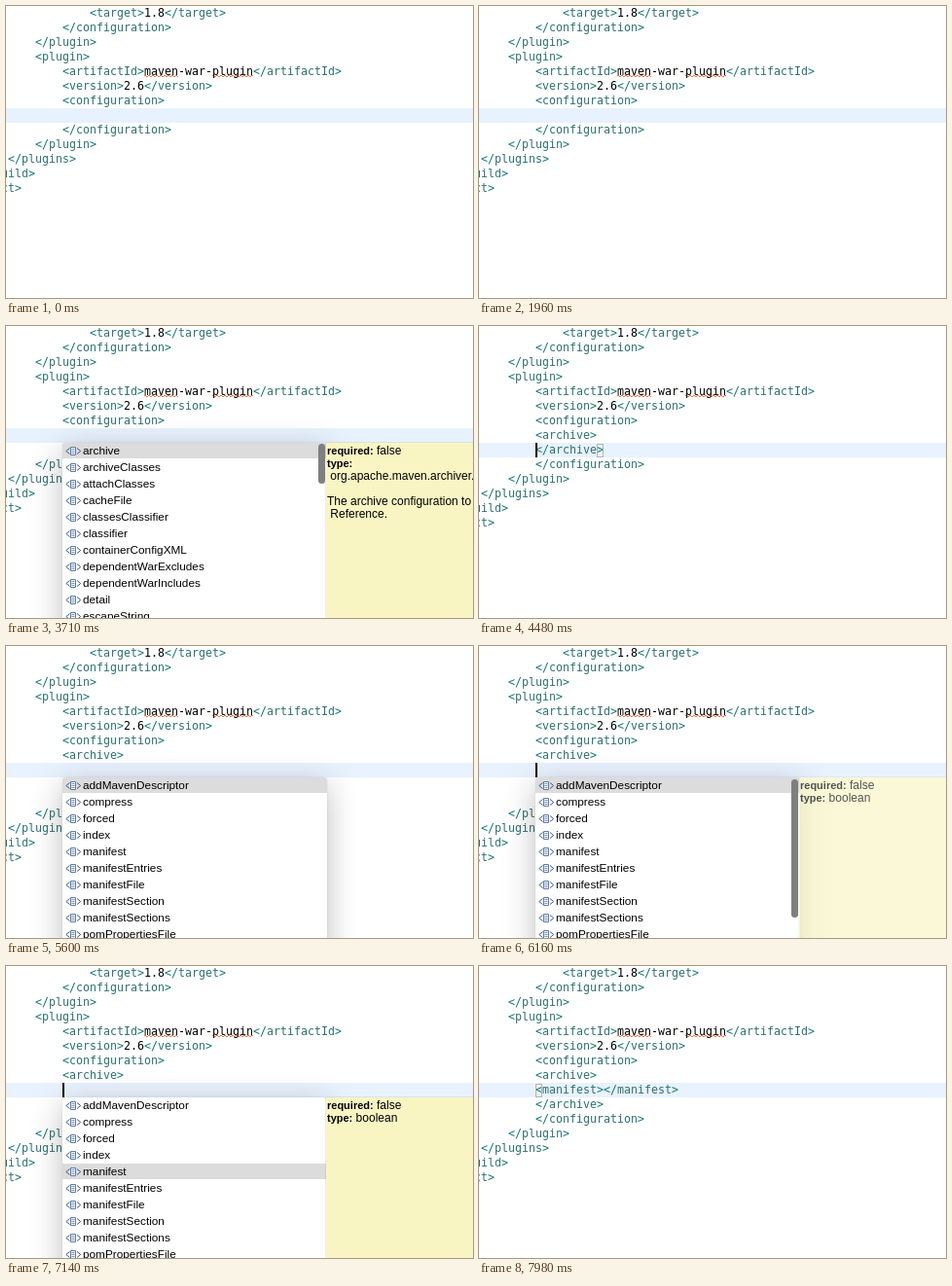
These frames come from a looping animation (480x300 px, 8000 ms). An HTML page:

```html
<!DOCTYPE html>
<html lang="en">
<head>
<meta charset="utf-8">
<title>Editor completion</title>
<style>
html, body { margin: 0; width: 100%; height: 100%; overflow: hidden; background: #fff; }
#stage { position: relative; width: 480px; height: 300px; overflow: hidden; background: #fff; }
#stage div { position: absolute; box-sizing: border-box; }

#code { inset: 0; font: 11.63px/15px "DejaVu Sans Mono", monospace; color: #000; white-space: pre; }
#code .tag { color: #2f7070; }
#code .tag i { color: #147474; font-style: normal; }
.typo {
  display: inline-block; height: 15px; vertical-align: top;
  background:
    repeating-linear-gradient(90deg, #ec7a48 0 2px, transparent 2px 4px) 0 11px / 100% 1px no-repeat,
    repeating-linear-gradient(90deg, transparent 0 2px, #ec7a48 2px 4px) 0 12px / 100% 1px no-repeat;
}
#current { left: 0; width: 480px; height: 15px; background: #e8f2fe; }
#caret { width: 2px; height: 15px; background: #000; }
#match { width: 7px; height: 14px; border: 1px solid #b4b4b4; }

.popup, .doc { color: #000; white-space: pre; }
.popup { left: 58px; width: 272px; height: 240px; background: #fff; border-radius: 4px;
  font: 11.8px/17px "Liberation Sans", Arial, sans-serif;
  box-shadow: 0 8px 32px rgba(0, 0, 0, .26), 0 0 1px rgba(0, 0, 0, .3); }
.popup .rows { inset: 0; overflow: hidden; border-radius: 4px; }
.popup .row { left: 0; width: 272px; height: 16px; padding-left: 21px; }
.popup .row.on { background: #dcdcdc; }
.popup svg { position: absolute; left: 3px; top: 3px; }
.thumb { left: 263px; width: 7px; border-radius: 4px; background: #7f7f7f; }
.doc { left: 329px; width: 200px; height: 240px; padding: 2px 0 0 1px;
  font: 12px/13px "Liberation Sans", Arial, sans-serif;
  background: #f9f5c3; box-shadow: 0 0 1px rgba(0, 0, 0, .4); }
.doc b { font-size: 11px; }
</style>
</head>
<body>
<div id="stage">
  <div id="current"></div>
  <div id="code"></div>
  <div id="match"></div>
  <div id="caret"></div>
</div>
<script>
const LOOP = 8000, TICK = 70, LINE = 15, ROW = 17;
const stage = document.getElementById('stage');
const [current, code, match, caret] =
  ['current', 'code', 'match', 'caret'].map(id => document.getElementById(id));

// Lines are [indent level, text]; one level is four characters.
const head = [
  [3, '<target>1.8</target>'],
  [2, '</configuration>'],
  [1, '</plugin>'],
  [1, '<plugin>'],
  [2, '<artifactId>~maven~-war-~plugin~</artifactId>'],
  [2, '<version>2.6</version>'],
  [2, '<configuration>']
];
const tail = [
  [2, '</configuration>'],
  [1, '</plugin>'],
  [0, '</plugins>'],
  [-1, '</build>'],
  [-2, '</project>']
];

const edits = [
  { at: 0, row: 7, lines: [''] },
  { at: 3780, row: 7, lines: ['<archive></archive>'] },
  { at: 4480, row: 8, lines: ['<archive>', '</archive>'] },
  { at: 4620, row: 9, lines: ['<archive>', '', '</archive>'] },
  { at: 5040, row: 8, lines: ['<archive>', '', '</archive>'] },
  { at: 7700, row: 8, lines: ['<archive>', '<manifest></manifest>', '</archive>'] }
];

// Visible spans: [from, to, x, row]
const caretSpans = [
  [1400, 1960, 58, 7], [2590, 3080, 58, 7], [3780, 4270, 121, 7],
  [4480, 4620, 58, 8], [4620, 5040, 58, 9], [5040, 5180, 58, 8],
  [5670, 6230, 58, 8], [6790, 7350, 58, 8], [7770, 7980, 128, 8]
];
const matchSpans = [
  [3780, 4480, 58, 7], [4480, 4620, 121, 8], [4620, 5040, 121, 9], [7770, LOOP, 58, 8]
];

const popups = [
  {
    from: 3010, to: 3780, top: 120, thumb: [1, 41], picks: [3010], fadeOut: LOOP,
    items: 'archive archiveClasses attachClasses cacheFile classesClassifier classifier ' +
      'containerConfigXML dependentWarExcludes dependentWarIncludes detail escapeString',
    doc: '<b>required:</b> false\n<b>type:</b>\n org.apache.maven.archiver.MavenArchiveConfiguration\n\n' +
      'The archive configuration to use. See\n Reference.'
  },
  {
    from: 5600, to: 7700, top: 135, thumb: [2, 142], picks: [5600, 6370, 6860, 7000, 7140], fadeOut: 6650,
    items: 'addMavenDescriptor compress forced index manifest manifestEntries manifestFile ' +
      'manifestSection manifestSections pomPropertiesFile',
    doc: '<b>required:</b> false\n<b>type:</b> boolean'
  }
];

const icon = `<svg width="17" height="11" fill="none" stroke="#3c5c88">
  <path d="M4.5 2.5L.8 5.5l3.7 3M12 2.5l3.7 3-3.7 3"/>
  <path d="M5.5 1.5h5v8h-5z" fill="#f2f6fb" stroke="#5f7ca4"/>
  <path d="M6.5 3.5h3M6.5 5.5h3M6.5 7.5h3" stroke="#7f98b8"/></svg>`;

const ramp = (t, from, length) => Math.min(1, Math.max(0, (t - from) / length));
const latest = (list, t) => list.filter(e => e.at <= t).pop();

function add(parent, className, html = '') {
  const el = document.createElement('div');
  el.className = className;
  el.innerHTML = html;
  parent.append(el);
  return el;
}

const markup = text => text
  .replace(/<(\/?)(\w+)>/g, '<span class="tag"><i>&lt;$1</i>$2<i>&gt;</i></span>')
  .replace(/~(\w+)~/g, '<span class="typo">$1</span>');

function renderCode(lines) {
  code.textContent = '';
  [...head, ...lines.map(text => [2, text]), ...tail].forEach(([level, text], i) => {
    const el = add(code, '', markup(text));
    el.style.left = 2 + level * 28 + 'px';
    el.style.top = i * LINE + 'px';
  });
}

function place(el, spans, t, inset) {
  const span = spans.find(([from, to]) => t >= from && t < to);
  el.hidden = !span;
  if (!span) return;
  el.style.left = span[2] + 'px';
  el.style.top = span[3] * LINE + inset + 'px';
}

for (const p of popups) {
  p.el = add(stage, 'popup');
  const list = add(p.el, 'rows');
  p.rows = p.items.split(' ').map((name, i) => {
    const row = add(list, 'row', icon + name);
    row.style.top = i * ROW + 'px';
    return row;
  });
  p.bar = add(p.el, 'thumb');
  p.bar.style.top = p.thumb[0] + 'px';
  p.bar.style.height = p.thumb[1] + 'px';
  p.note = add(stage, 'doc', p.doc);
  p.el.style.top = p.note.style.top = p.top + 'px';
}

function updatePopup(p, t) {
  const open = t >= p.from && t < p.to;
  p.el.hidden = p.note.hidden = !open;
  if (!open) return;
  const picked = p.picks.filter(at => at <= t).length - 1;
  p.rows.forEach((row, i) => row.classList.toggle('on', i === picked));
  p.bar.style.opacity = ramp(t, p.from + 140, 280) * (1 - ramp(t, p.fadeOut, 350));
  p.note.style.opacity = ramp(t, p.from + 420, 210);
}

let shown;
function draw(time) {
  const t = Math.floor(time % LOOP / TICK) * TICK;
  const edit = latest(edits, t);
  if (edit !== shown) {
    shown = edit;
    renderCode(edit.lines);
    current.style.top = edit.row * LINE + 'px';
  }
  place(caret, caretSpans, t, 0);
  place(match, matchSpans, t, 1);
  popups.forEach(p => updatePopup(p, t));
}

const start = performance.now();
function frame() {
  draw(performance.now() - start);
  requestAnimationFrame(frame);
}
frame();
</script>
</body>
</html>
```
